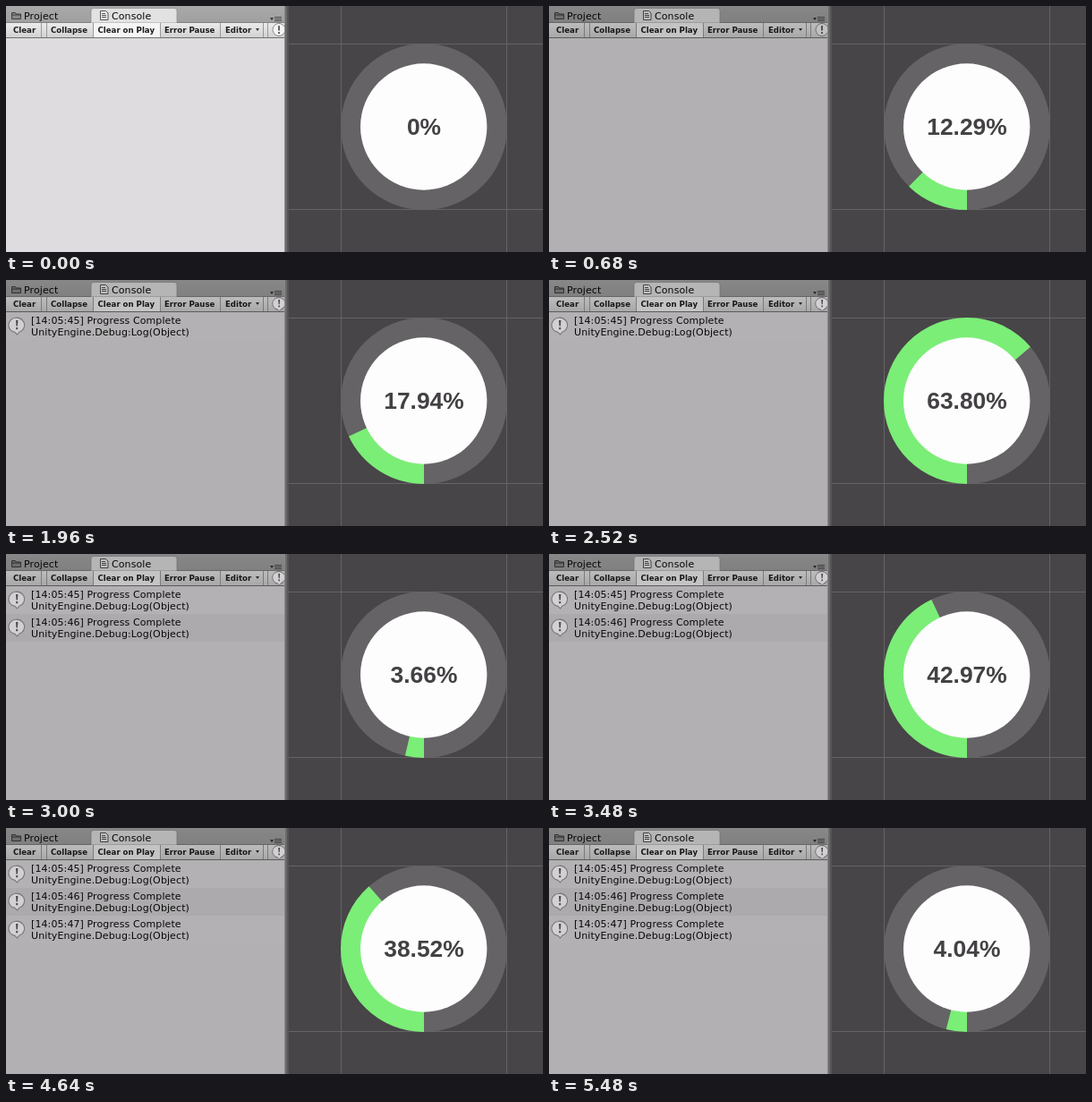
An HTML page that plays this animation: 600x275 px, repeating every 5520 ms.

```html
<!DOCTYPE html>
<html lang="en">
<head>
<meta charset="utf-8">
<title>Circular progress</title>
<style>
  html, body { margin: 0; width: 100%; height: 100%; overflow: hidden; background: #474547; }
  svg { display: block; width: 600px; height: 275px; }
  text { font-family: "DejaVu Sans", sans-serif; font-size: 11px; letter-spacing: .1px; fill: #080808; white-space: pre; }
  .bar text { font-size: 8.6px; font-weight: bold; letter-spacing: 0; fill: #1c1c1c; }
  #percent { font: bold 26.4px "Liberation Sans", Arial, sans-serif; letter-spacing: 0; fill: #434143; text-anchor: middle; filter: blur(.5px); }
</style>
</head>
<body>
<svg viewBox="0 0 600 275">
  <defs>
    <linearGradient id="tabs" x2="0" y2="1"><stop stop-color="#a9a9a9"/><stop offset="1" stop-color="#9f9f9f"/></linearGradient>
    <linearGradient id="tool" x2="0" y2="1"><stop stop-color="#ebebeb"/><stop offset="1" stop-color="#d2d2d2"/></linearGradient>
    <symbol id="bubble" viewBox="0 0 22 22" width="22" height="22">
      <path d="M9 18.4A8.8 8.2 0 1 1 14 18L11.500 21Z" fill="#d2d0d2" stroke="#777577" stroke-width="1.1"/>
      <path d="M10 5h2.400l-.5 6.500h-1.400zM10.200 13h2v2.200h-2z" fill="#4c4a4c"/>
    </symbol>
    <clipPath id="panel"><path d="M0 0H311V275H0z"/></clipPath>
  </defs>

  <g clip-path="url(#panel)">
    <path d="M0 0H312V275H0z" fill="#dedcde"/>
    <path d="M0 0H312V19H0z" fill="url(#tabs)"/>
    <path d="M95 19V5.500q0-3 3-3H188q3 0 3 3V19z" fill="#e2e2e2" stroke="#8c8c8c" stroke-width=".7"/>
    <path d="M6.500 14.500v-7h4l1 1.500h5v5.500zM6.500 10h10" fill="#888" stroke="#3c3c3c"/>
    <path d="M105.500 5.500h6l2.500 2.500v7.500h-8.500zM107 8.500h4M107 10.500h5M107 12.500h5" fill="#eee" stroke="#444" stroke-width=".9"/>
    <text x="20" y="14.500">Project</text>
    <text x="118" y="14.500">Console</text>
    <path d="M295 13h4l-2 3z" fill="#333"/>
    <path d="M300 12.500h8M300 14.500h8M300 16.500h8" stroke="#444" stroke-width=".9"/>
    <g class="bar">
      <path d="M0 19H312V35H0z" fill="url(#tool)"/>
      <path d="M97 19H172V35H97z" fill="#f6f5f6"/>
      <path d="M39.500 19v16M45.500 19v16M97.500 19v16M172.500 19v16M239.500 19v16M287.500 19v16M292.500 19v16" stroke="#999"/>
      <path d="M0 18.500H95M191 18.500H312" stroke="#808080"/>
      <path d="M0 35.500H312" stroke="#707070"/>
      <text x="8" y="30">Clear</text>
      <text x="50" y="30">Collapse</text>
      <text x="102.500" y="30">Clear on Play</text>
      <text x="177" y="30">Error Pause</text>
      <text x="245" y="30">Editor</text>
      <path d="M279 25h4l-2 3z" fill="#333"/>
      <circle cx="305" cy="26.500" r="7" fill="#f3f3f3" stroke="#888"/>
      <path d="M305 22v5.500M305 29v2" stroke="#444" stroke-width="1.6"/>
    </g>
    <path id="tint" d="M0 0H312V275H0z" opacity=".2"/>
    <use id="counter" href="#bubble" transform="translate(296.200 18) scale(.8)"/>
    <g id="logs"></g>
  </g>

  <path d="M311 0h5v275h-5z" fill="#565456"/>
  <path d="M311.500 0v275" stroke="#8a888a"/>
  <path d="M312 0h2v275h-2z" fill="#6b696b"/>
  <path d="M316 42.500H600M316 227.500H600M374.500 0V275M559.500 0V275" stroke="#656365"/>
  <g transform="translate(467 135)">
    <circle r="93" fill="#656365"/>
    <circle id="arc" r="81.500" fill="none" stroke="#7bee77" stroke-width="23" pathLength="100" transform="rotate(90)"/>
    <circle cx="-.3" r="70.700" fill="#fefdfe"/>
    <text id="percent" y="9"></text>
  </g>
</svg>
<script>
const LOOP = 5520, STEP = 40, GAIN = 3.276;
// [start in ms, percent at that moment]
const runs = [[560, 2.462], [1760, 1.556], [2960, .382], [4200, 2.484], [5400, 100], [5440, .764]];
const logTimes = runs.slice(1, 4).map(run => run[0]);
const $ = id => document.getElementById(id);
const show = (el, on) => el.setAttribute('visibility', on ? 'visible' : 'hidden');

$('logs').innerHTML = logTimes.map((_, i) => `
  <g transform="translate(0 ${i * 31})">
    <path d="M0 36H312V67H0z" fill="${i % 2 ? '#acaaac' : '#b3b1b3'}"/>
    <use href="#bubble" x="1" y="40"/>
    <text x="28" y="49">[14:05:${45 + i}] Progress Complete</text>
    <text x="28" y="62">UnityEngine.Debug:Log(Object)</text>
  </g>`).join('');

function progress(t) {
  const run = runs.findLast(([start]) => t >= start);
  return run ? Math.min(100, run[1] + Math.floor((t - run[0]) / STEP) * GAIN) : 0;
}

function draw() {
  const t = performance.now() % LOOP, p = progress(t);
  show($('tint'), t >= 280);
  show($('counter'), t >= logTimes[0]);
  [...$('logs').children].forEach((log, i) => show(log, t >= logTimes[i]));
  show($('arc'), p > 0);
  $('arc').setAttribute('stroke-dasharray', p < 100 ? `${p} 200` : 'none');
  $('percent').textContent = (p % 100 ? p.toFixed(2) : p) + '%';
  requestAnimationFrame(draw);
}
draw();
</script>
</body>
</html>
```
